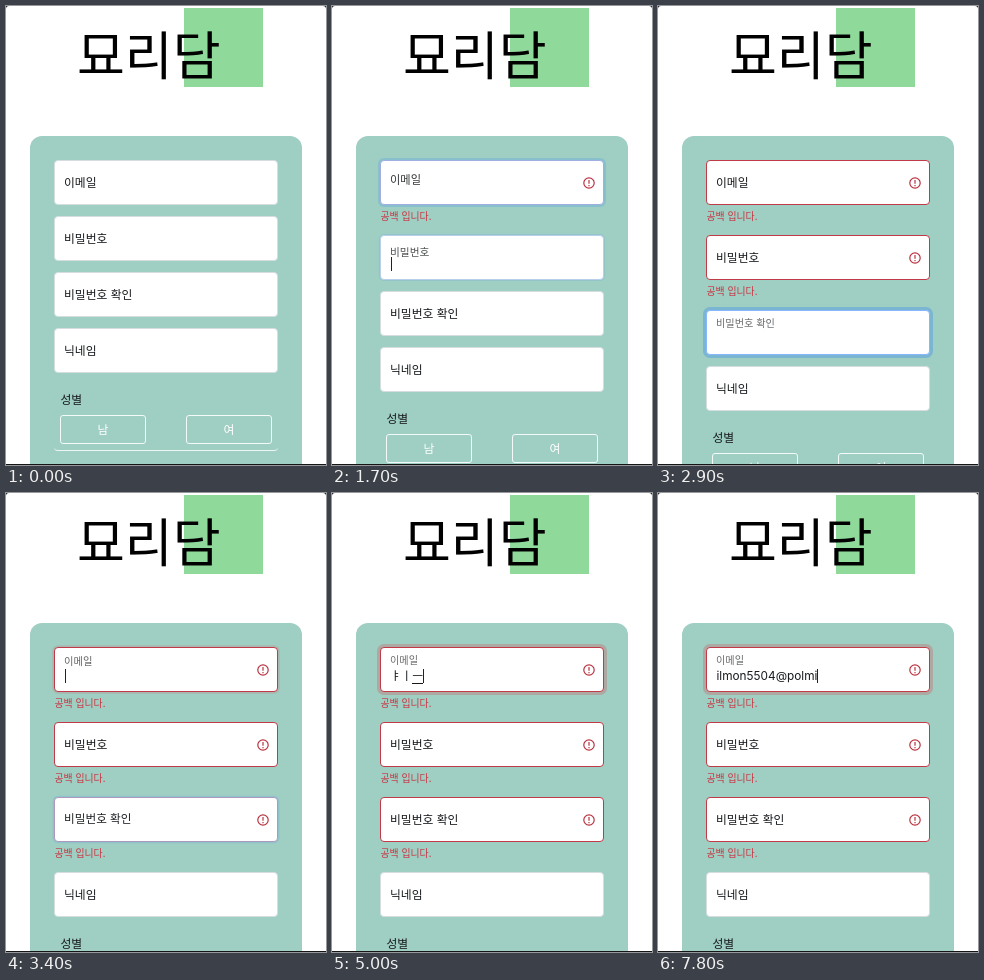
An HTML page for the animation above (8 s loop, 320 by 459 pixels).

```html
<!DOCTYPE html>
<html lang="ko">
<head>
<meta charset="utf-8">
<title>회원가입</title>
<style>
  * { box-sizing: border-box; }
  html, body { margin: 0; width: 100%; height: 100%; overflow: hidden; background: #151515; }
  body { position: relative; font: 11.8px/16px "Noto Sans CJK KR", "Noto Sans CJK", sans-serif; color: #16191c; }
  div, span, svg { position: absolute; white-space: pre; }
  #page { width: 320px; height: 458px; background: #fff; border-radius: 3px 3px 0 0; overflow: hidden; }
  #mark { left: 178px; top: 2px; width: 79px; height: 79px; background: #8fd99a; }
  #title { left: 71px; top: 12px; font-size: 52px; line-height: 70px; color: #000; }
  #panel { left: 24px; top: 130px; width: 272px; height: 400px; border-radius: 12px; background: #9fcec2; }
  .field { left: 48px; width: 224px; height: 45px; border: 1px solid; border-radius: 4px; background: #fff; }
  .label { left: 9px; top: 13.3px; transform-origin: left center; }
  .value { left: 9.5px; top: 20px; height: 16px; display: flex; align-items: center; font-family: Inter, "Noto Sans CJK KR", "Noto Sans CJK", sans-serif; }
  .value u { text-decoration: none; border-bottom: 1px solid; line-height: 13px; }
  .caret { width: 1px; height: 14px; background: #222; }
  .icon { left: 202px; top: 15.5px; fill: none; stroke: #b8323f; stroke-width: 1.2; }
  .error { left: 48.5px; font-size: 9.9px; color: #c83543; }
  #gender { left: 48px; width: 224px; height: 67px; border-bottom: 1px solid #edf5f3; border-radius: 4px; }
  #gender span { left: 6.5px; top: 6.5px; }
  .choice { top: 31px; width: 86px; height: 29px; border: 1px solid #f4faf8; border-radius: 3px; color: #fff; text-align: center; line-height: 26px; }
</style>
</head>
<body>
<div id="page">
  <div id="mark"></div>
  <div id="title">묘리담</div>
  <div id="panel"></div>
  <div id="gender"><span>성별</span><div class="choice" style="left:6px">남</div><div class="choice" style="left:132px">여</div></div>
</div>
<script>
const LOOP = 8000, BLINK = 530, NEVER = Infinity;
const GREY = '#d5dde0', BLUE = '#86b7fe', RED = '#c03a47';
const page = document.getElementById('page');
const gender = document.getElementById('gender');

// focus: [start, end] spans; invalid: when the error appears
const fields = [
  { name: '이메일', focus: [[980, 1640], [3320, NEVER]], invalid: 1640 },
  { name: '비밀번호', focus: [[1640, 2020]], invalid: 2020 },
  { name: '비밀번호 확인', focus: [[2020, 3320]], invalid: 3320 },
  { name: '닉네임', focus: [], invalid: NEVER },
];

const jamo = 'ㅑㅣㅡ', jamoKeys = [4500, 4700, 4900], erasures = [5200, 5300, 5400];
const email = 'ilmon5504@polmi';
const emailKeys = [5700, 5900, 6100, 6300, 6400, 6600, 6700, 6800, 6900, 7100, 7300, 7400, 7500, 7600, 7800];
const keyTimes = [...jamoKeys, ...erasures, ...emailKeys];

for (const field of fields) {
  field.box = document.createElement('div');
  field.box.className = 'field';
  field.box.innerHTML = `<span class="label">${field.name}</span>
    <span class="value"><b style="font-weight:400"></b><i class="caret"></i></span>
    <svg class="icon" width="12" height="12"><circle cx="6" cy="6" r="5.2"/><path d="M6 3V6.8M6 7.9V9.2"/></svg>`;
  field.error = document.createElement('div');
  field.error.className = 'error';
  field.error.textContent = '공백 입니다.';
  page.append(field.box, field.error);
  for (const part of ['label', 'caret', 'icon']) field[part] = field.box.querySelector('.' + part);
  field.text = field.box.querySelector('b');
}

const ease = x => { x = Math.min(1, Math.max(0, x)); return x * x * (3 - 2 * x); };
const mix = (from, to, p) => `color-mix(in srgb, ${to} ${p * 100}%, ${from})`;
const count = (times, t) => times.filter(time => time <= t).length;
const show = (element, visible) => element.style.visibility = visible ? 'visible' : 'hidden';

// 0 to 1 while focus fades in over `duration`, back to 0 after blur
const focusLevel = (spans, t, duration) => Math.max(0, ...spans.map(([start, end]) =>
  ease((t - start) / duration) * (1 - ease((t - end) / duration))));

function typedHtml(t) {
  const latin = count(emailKeys, t);
  if (latin) return email.slice(0, latin);
  const text = jamo.slice(0, count(jamoKeys, t) - count(erasures, t));
  return text && text.slice(0, -1) + `<u>${text.at(-1)}</u>`;
}

function render(t) {
  let top = 154;
  fields.forEach((field, index) => {
    const { box, error, label, caret, icon, text, focus, invalid } = field;
    const active = focus.find(([start, end]) => t >= start && t < end);
    const isInvalid = t >= invalid;
    const lift = focusLevel(focus, t, 100), ring = focusLevel(focus, t, 150);
    const settled = t >= invalid + 150;
    const rest = mix(GREY, RED, ease((t - invalid) / 150));

    box.style.top = top + 'px';
    box.style.borderColor = mix(rest, settled ? RED : BLUE, ring);
    box.style.boxShadow = `0 0 0 ${3 * ring}px rgba(${settled ? '220,53,69' : '13,110,253'},${.25 * ring})`;
    label.style.transform = `translateY(${-9 * lift}px) scale(${1 - .14 * lift})`;
    label.style.opacity = 1 - .35 * lift;

    const html = index === 0 ? typedHtml(t) : '';
    if (text.innerHTML !== html) text.innerHTML = html;
    const lastInput = active && Math.max(active[0], ...keyTimes.filter(time => index === 0 && time <= t));
    show(caret, active && Math.floor((t - lastInput) / BLINK) % 2 === 0);
    show(icon, isInvalid);
    show(error, isInvalid);
    error.style.top = top + 48 + 'px';
    top += isInvalid ? 75 : 56;
  });
  gender.style.top = top + 'px';
}

const begin = performance.now();
function tick() {
  render((performance.now() - begin) % LOOP);
  requestAnimationFrame(tick);
}
tick();
</script>
</body>
</html>
```
